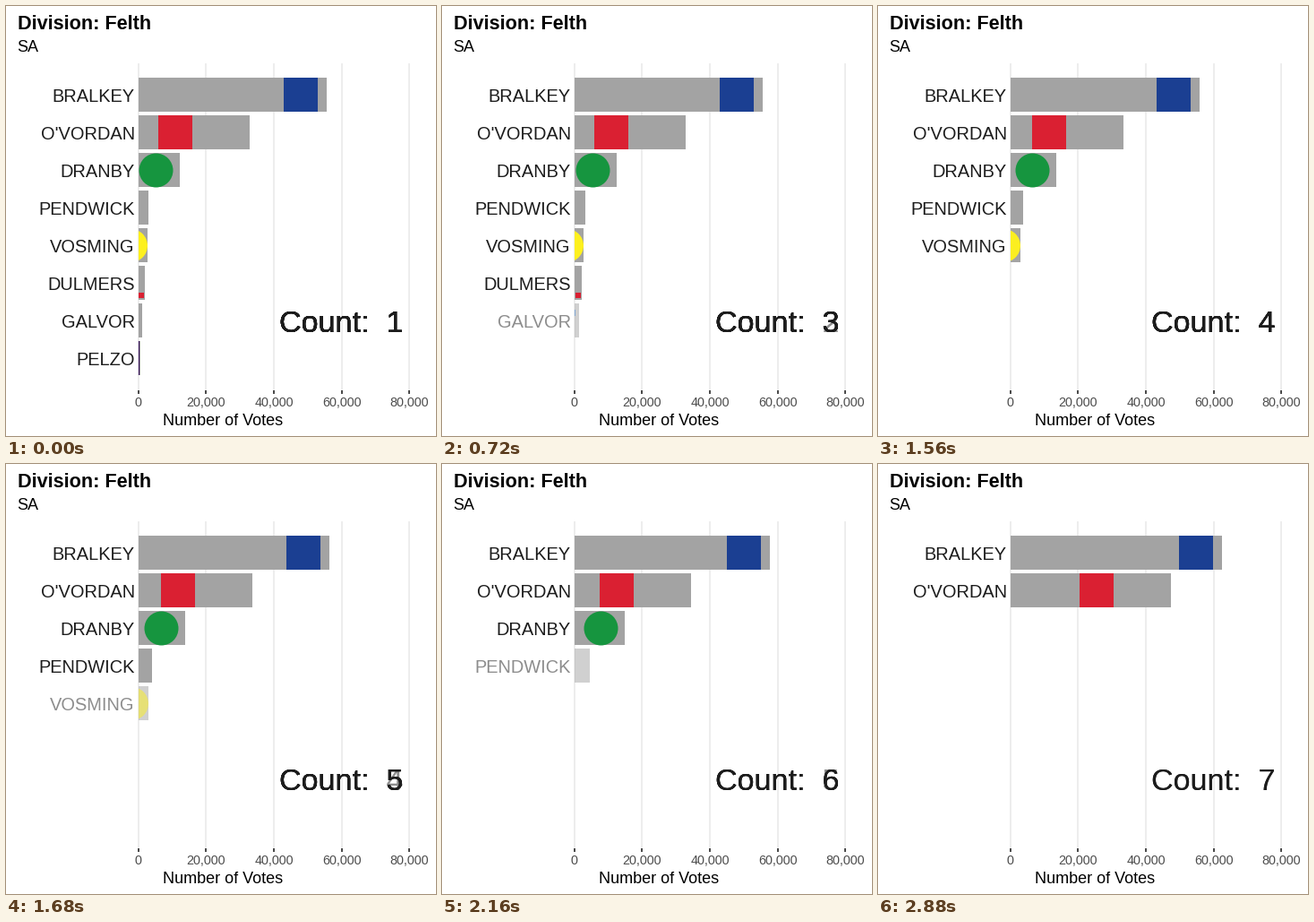
Write a matplotlib script that moves like this. It is 480x480 px and loops after 3000 ms.

```python
import matplotlib.pyplot as plt
from matplotlib.animation import FuncAnimation
from matplotlib.patches import Rectangle

SIZE, DPI = 480, 100
PT = 72 / DPI                      # points per pixel
FRAMES, INTERVAL = 25, 120
STEP = 4                           # frames from one count to the next
X0, PX_PER_VOTE = 147.7, 302.5 / 80000
TOP, BOTTOM = 64, 428.5
ROW_Y, ROW_GAP, BAR_H = 99, 42, 38
INK = "#1c1c1c"

# name, votes at each count, logo (marker, colour, size, dx from bar end, dy)
ROWS = [
    ("BRALKEY", [55600, 55650, 55800, 55900, 57150, 58500, 62450],
     ("s", "#1b3f92", 38, -29, 0)),
    ("O'VORDAN", [32850, 32950, 33050, 33350, 33900, 35150, 47350],
     ("s", "#da2032", 38, -83, 0)),
    ("DRANBY", [12200, 12350, 12750, 13500, 14050, 15700],
     ("o", "#16953f", 38, -27, 0)),
    ("PENDWICK", [2950, 3100, 3400, 3750, 4550], None),
    ("VOSMING", [2700, 2750, 2800, 2950], ("o", "#fdf01e", 37, -19, 0)),
    ("DULMERS", [1950, 2050, 2350], ("s", "#da2032", 6, -4, 14)),
    ("GALVOR", [1100, 1350], ("s", "#3f8ae0", 7, -7.5, -9)),
    ("PELZO", [600], ("s", "#2e0854", 38, -19.5, 0)),
]

plt.rcParams["font.family"] = "Liberation Sans"
fig = plt.figure(figsize=(SIZE / DPI, SIZE / DPI), dpi=DPI, facecolor="white")
ax = fig.add_axes([0, 0, 1, 1])
ax.set(xlim=(0, SIZE), ylim=(SIZE, 0))
ax.axis("off")


def write(x, y, text, px, color="black", **kw):
    return ax.text(x, y, text, fontsize=px * PT, color=color,
                   va="baseline", **kw)


def ease(t):
    """Quintic in-out."""
    return 16 * t ** 5 if t < 0.5 else 1 - 16 * (1 - t) ** 5


write(13, 26, "Division: Felth", 21.6, weight="bold")
write(12, 51, "SA", 18)
write(242, 468, "Number of Votes", 18, ha="center")
for votes in range(0, 80001, 20000):
    x = X0 + votes * PX_PER_VOTE
    ax.plot([x, x], [TOP, BOTTOM], color="#ebebeb", lw=1.75 * PT,
            solid_capstyle="butt", zorder=1)
    ax.plot([x, x], [BOTTOM, BOTTOM + 4.5], color="#333333", lw=1.75 * PT,
            solid_capstyle="butt", zorder=1)
    write(x, 447, f"{votes:,}", 14.4, "#4d4d4d", ha="center")

panel = Rectangle((X0, TOP), SIZE - X0, BOTTOM - TOP,
                  transform=ax.transData)


class Row:
    def __init__(self, i, name, votes, logo):
        self.votes = votes
        self.y = ROW_Y + i * ROW_GAP
        self.bar = ax.add_patch(Rectangle((X0, self.y - BAR_H / 2), 0, BAR_H,
                                          fc="#a3a3a3", lw=0, zorder=2))
        self.name = write(143.7, self.y + 8, name, 20, INK, ha="right")
        # Every row prints the counter, so copies overlap
        self.count = write(305, 364, "", 34.14, INK, zorder=5)
        self.parts = [self.bar, self.name, self.count]
        self.mark = None
        if logo:
            shape, color, size, self.dx, self.dy = logo
            self.mark, = ax.plot([], [], shape, color=color, mew=0,
                                 ms=size * PT, zorder=3)
            self.mark.set_clip_path(panel)
            self.parts.append(self.mark)

    def update(self, state, p):
        v, alpha, number = self.votes, 1, state + 1
        if state >= len(v):
            value, alpha = 0, 0
        elif state + 1 < len(v):
            value = v[state] + (v[state + 1] - v[state]) * p
            number += p >= 0.5
        else:
            value, alpha = v[state], 1 - p
        width = value * PX_PER_VOTE
        self.bar.set_width(width)
        self.count.set_text(f"Count:  {number}")
        if self.mark:
            self.mark.set_data([X0 + width + self.dx], [self.y + self.dy])
        for part in self.parts:
            part.set_alpha(alpha)
            part.set_visible(alpha > 0)


rows = [Row(i, *row) for i, row in enumerate(ROWS)]


def draw(frame):
    state, offset = divmod(frame, STEP)
    p = ease(offset / STEP)
    for row in rows:
        row.update(state, p)
    return []


anim = FuncAnimation(fig, draw, frames=FRAMES, interval=INTERVAL,
                     init_func=lambda: draw(0), repeat=True, repeat_delay=0)
plt.show()
```
